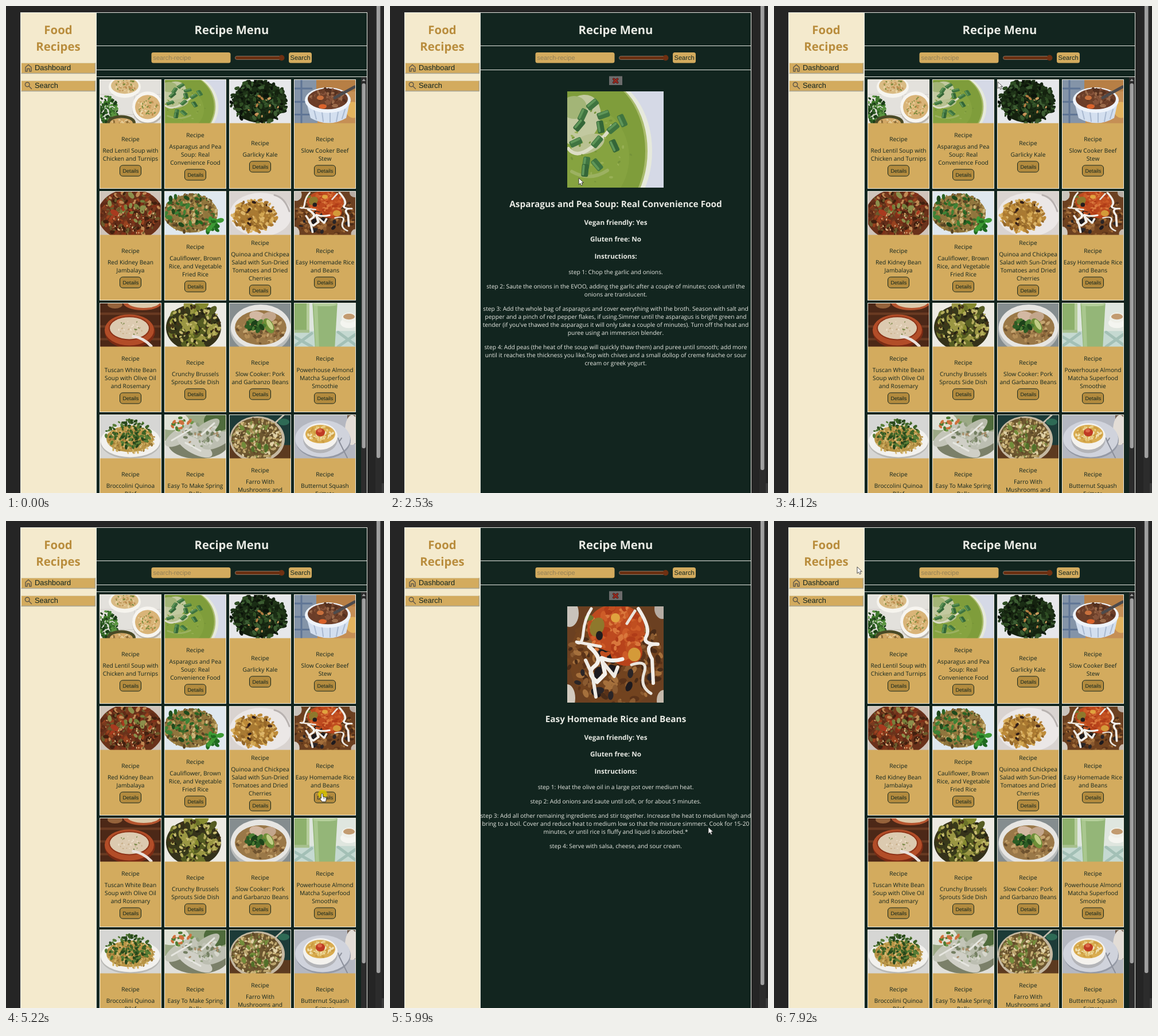
An HTML page for the animation above (7.99 s loop, 659 by 850 pixels).

```html
<!DOCTYPE html>
<html lang="en">
<head>
<meta charset="utf-8">
<title>Recipe menu</title>
<style>
html, body { margin: 0; width: 100%; height: 100%; overflow: hidden; background: #252525; }
svg { display: block; }
text { font: 10.22px "Open Sans", "Noto Sans", sans-serif; text-anchor: middle; text-rendering: geometricPrecision; }
.ui { font-family: "Liberation Sans", Arial, sans-serif; text-anchor: start; fill: #12251f; }
.dark { fill: #12251f; }
.light { fill: #e8eae4; }
.brand { fill: #b98d3d; }
.hint { fill: #8a7a56; }
.bold { font-weight: 700; }
.soft { filter: blur(.6px); }
</style>
</head>
<body>
<svg id="stage" width="659" height="850" viewBox="0 0 659 850"></svg>
<script>
const GREEN = '#12251f', GOLD = '#d3ab5e', LOOP = 7990;

let seed = 1;
const rnd = () => {
  seed = (seed * 1664525 + 1013904223) >>> 0;
  return seed / 4294967296;
};
const fix = v => v.toFixed(1);

// Drawing helpers, all returning SVG markup
const R = (x, y, w, h, c, extra = '') =>
  `<rect x="${x}" y="${y}" width="${w}" height="${h}" fill="${c}" ${extra}/>`;
const E = (x, y, rx, ry, c, turn = 0) =>
  `<ellipse cx="${fix(x)}" cy="${fix(y)}" rx="${fix(rx)}" ry="${fix(ry)}" fill="${c}" transform="rotate(${fix(turn)} ${fix(x)} ${fix(y)})"/>`;
const L = (d, c, w) =>
  `<path d="${d}" fill="none" stroke="${c}" stroke-width="${w}" stroke-linecap="round" stroke-linejoin="round"/>`;
const T = (s, x, y, cls, size) =>
  `<text x="${x}" y="${y}" class="${cls}"${size ? ` style="font-size:${size}px"` : ''}>${s}</text>`;
const bg = c => R(-5, -5, 180, 180, c);

// Scatter n small blobs inside an ellipse
const S = (n, x, y, rx, ry, size, colors) => {
  const list = colors.split(' ');
  let out = '';
  for (let i = 0; i < n; i++) {
    const a = rnd() * 2 * Math.PI, r = Math.sqrt(rnd()), s = size * (.6 + .8 * rnd());
    out += E(x + rx * r * Math.cos(a), y + ry * r * Math.sin(a), s, s * .6, list[i % list.length], rnd() * 180);
  }
  return out;
};
const chive = (x, y, turn, c = '#3f7440') =>
  R(x - 6, y - 11, 12, 22, c, `rx="3" transform="rotate(${turn} ${x} ${y})"`) +
  R(x - 5, y - 10, 4, 19, '#5f9659', `rx="2" transform="rotate(${turn} ${x} ${y})"`);

// Photos are drawn in a 106 x 75 box, the two enlarged ones in 168 x 168
const lentil = () => bg('#e3e1dc') + L('M0 25H106M0 60H106M60 0V75', '#cfccc6', 1) +
  E(43, 12, 28, 19, '#f6f4ee') + E(43, 10, 24, 14, '#d9bb84') + S(40, 43, 10, 20, 11, 2, '#e9d3a4 #b98a4d #7c8a3c #c99f62') +
  E(84, 49, 28, 28, '#b9b4ab') + E(83, 47, 27, 27, '#f7f5f0') + E(83, 47, 22, 21, '#d9b478') +
  S(70, 83, 47, 18, 17, 2, '#ecd6a6 #bf9050 #7d8d40 #e0bb7a') +
  S(130, 11, 53, 19, 25, 3, '#2c5a22 #3f7a2c #1c3d18 #5a9440') +
  E(37, 74, 25, 13, '#4a4a26') + E(37, 75, 20, 9, '#d2a765') + S(20, 37, 74, 16, 6, 2, '#8a6a35 #e5cb96');

const soup = () => bg('#d5d9e6') + E(56, 104, 92, 128, '#e6e9dc') + E(48, 104, 92, 128, '#a9bb6c') +
  E(45, 104, 91, 128, '#7f9d3b') + E(30, 115, 78, 90, '#86a340') +
  E(22, 50, 34, 46, '#c2c9a0', 25) + E(12, 28, 22, 20, '#a3b577') + E(36, 92, 30, 16, '#b9c192', -20) +
  L('M2 100Q16 118 42 98T78 60', '#dcddc6', 6) + L('M8 140Q40 158 70 138', '#9cb161', 6) +
  S(40, 50, 95, 65, 65, 2.5, '#98b055 #75933a') +
  chive(44, 23, 50) + chive(63, 41, 70) + chive(27, 41, 25) + chive(21, 59, 40, '#346638') + chive(80, 64, 50) +
  chive(96, 51, -25) + chive(58, 62, -10, '#346638') + chive(15, 89, 65) + chive(52, 88, 40) + chive(82, 95, -25, '#346638') +
  chive(33, 125, 8) + chive(31, 138, 5, '#346638') + chive(52, 128, -40);

const kale = () => bg('#e6e7ea') + E(51, 38, 45, 36, '#15220f') +
  S(260, 51, 38, 49, 38, 4, '#14220f #22381a #2f4e24 #0b130a #1a2d15 #3c5c32') + S(14, 58, 46, 30, 20, 2.5, '#b27c42 #c99a5e');

const stew = () => bg('#c58f55') + R(0, 0, 40, 75, '#8494a8') + L('M0 15H30M0 38H22M0 60H40M12 0V75', '#5f7595', 3) +
  R(38, -5, 70, 25, '#b77f45') + E(102, 52, 12, 14, '#e2b35e') +
  '<path d="M20 36L28 66Q60 84 90 66L97 36Z" fill="#d3dfef"/>' + L('M34 52L38 68M48 56L50 72M62 57V73M76 56L73 72M88 51L83 67', '#a9b9d0', 2) +
  E(58, 35, 40, 22, '#eef3fa') + E(58, 33, 35, 18, '#6b3d28') +
  S(60, 58, 32, 31, 15, 4, '#85533a #54301f #9a6a4a #6d4029') + E(49, 46, 7, 4, '#d9622b') + E(45, 31, 6, 4, '#c8703d') +
  L('M70 31L105 12', '#4d4b4d', 5);

const jambalaya = () => bg('#cfc4ba') + E(53, 40, 57, 45, '#6a321b') +
  S(280, 53, 38, 54, 41, 4, '#7a3b1f #98421f #5f2b17 #c08a55 #7f3019 #6b5a2c #41200f') +
  S(18, 50, 32, 40, 26, 6, '#76803c #a83a1f #8b8f4c') + S(50, 60, 50, 40, 22, 1.6, '#e0b98a #3a1d10');

const cauliflower = () => bg('#dfe8ee') + E(45, 38, 47, 33, '#8f753d') +
  S(280, 44, 37, 46, 33, 3, '#b0924f #7c6030 #ccb67c #594524 #3c6a2a #95793f') +
  S(26, 36, 32, 38, 27, 4.5, '#2c6424 #3f8235 #1f4a1c') + S(14, 82, 56, 20, 13, 5, '#1f6a1f #3d9a35');

const chickpea = () => bg('#d9d3d0') + E(54, 40, 54, 38, '#ebe7e6') + L('M78 6Q96 10 104 34', '#b8b2b0', 3) +
  E(43, 42, 33, 24, '#a87a33') + S(180, 43, 42, 39, 28, 3.5, '#bd8a38 #d3a752 #946729 #dcb56a #ab7931') +
  S(9, 47, 38, 30, 22, 3, '#2f1d18 #4a2d1c');

const rice = () => bg('#6b4021') + E(4, 12, 16, 24, '#c9c3bb') + E(0, 160, 14, 24, '#d2cabf') + E(166, 4, 14, 18, '#b6aca3') +
  E(168, 164, 12, 18, '#c5b9ab') + E(84, 92, 80, 88, '#72431f') +
  S(260, 84, 92, 82, 82, 6, '#8a5a30 #5b3319 #a5703c #70431f #4a2c18') + S(16, 80, 120, 75, 42, 8, '#1d1a1e #2a2527') +
  E(85, 38, 50, 42, '#bd4a1f') + E(103, 80, 28, 24, '#b8431b') +
  S(100, 87, 45, 47, 48, 6, '#cd5c28 #b03c18 #d9773c #c04f20') + E(52, 36, 12, 17, '#8e782c', 20) +
  E(84, 20, 8, 8, '#e0a33f') + E(117, 84, 11, 12, '#d49a39') + E(56, 51, 6, 8, '#211d1f') + E(38, 20, 8, 5, '#6f782c') +
  L('M42 4Q30 22 28 46T16 62L58 70', '#f0ece6', 5) + L('M38 70Q64 92 48 104T52 132L66 118L60 90Q78 98 96 92', '#f4f1ec', 7) +
  L('M32 94L44 120L50 158M64 100L82 122L88 106', '#eeeae4', 6) + L('M124 4Q146 38 138 52T158 66Q132 64 148 92L150 134', '#f2eee9', 6) +
  L('M112 102Q142 92 134 116T146 152M104 30L118 8', '#e9e4dc', 5);

const tuscan = () => bg('#4c2817') + L('M0 18H106M0 40H106M0 62H106', '#693a22', 4) + E(74, -2, 34, 14, '#b5552f') +
  E(76, -2, 28, 10, '#dcc9a9') + E(26, 2, 13, 7, '#96633b') +
  E(52, 49, 44, 29, '#7a2b14') + E(51, 46, 43, 27, '#b24d28') + E(51, 43, 36, 21, '#8c3217') + E(51, 43, 34, 19, '#dccab0') +
  S(26, 51, 42, 25, 13, 1.5, '#7d8b4c #efe2cd #c7ad87') + L('M58 57Q76 60 89 74', '#e9e1dc', 5);

const brussels = () => bg('#eceae2') + E(50, 42, 48, 40, '#35321a') +
  S(44, 52, 38, 46, 36, 10, '#85892f #555c22 #9a9643 #38391a #6c722a') + S(110, 52, 38, 46, 35, 3, '#b5ad5b #242313 #c7bb70 #453518');

const pork = () => bg('#858d8f') + E(54, 45, 53, 42, '#b9bcbb') + E(54, 41, 52, 39, '#e6e5e2') + E(54, 42, 45, 30, '#9a7848') +
  S(110, 54, 45, 41, 25, 3.5, '#b48e58 #8d6639 #c5a570 #6e522f') + E(49, 23, 15, 9, '#d3b8a2', 15) + E(68, 24, 13, 9, '#c3a68c', -15) +
  E(68, 39, 8, 14, '#6f8f38', -30) + E(70, 37, 4, 10, '#c2cd86', -30) + S(20, 44, 38, 16, 8, 5, '#2c5c24 #1d421a #4c7d33');

const matcha = () => bg('#dfe6df') + R(-5, 48, 116, 40, '#c5d9d1') + L('M0 58L30 75M0 74L30 52M76 50L106 72M76 75L106 54', '#a3c0b6', 5) +
  R(-5, -5, 30, 55, '#8db06c') + R(21, -5, 5, 55, '#b6cd9c') + R(-5, 46, 31, 5, '#a7c08e') +
  E(95, 34, 15, 9, '#f4f5f0') + E(95, 25, 13, 9, '#eff0e9') + E(95, 23, 10, 5, '#c29b70') +
  '<path d="M31 -5H75L70 80H36Z" fill="#94b678"/><path d="M33 -5H40L43 80H37Z" fill="#a9c78f"/>' + E(53, 2, 21, 3, '#b5cf9b');

const quinoa = () => bg('#d6d6d4') + E(53, 48, 52, 28, '#b9b9b6') + E(53, 45, 52, 28, '#f2f1ee') + E(52, 41, 41, 23, '#b99646') +
  S(200, 52, 42, 43, 24, 2.2, '#cfb062 #b8924a #dcc184 #9a7736') + S(120, 50, 32, 40, 24, 3, '#3c6226 #577d36 #28481c');

const rolls = () => bg('#9ba985') + E(12, 10, 30, 16, '#dfe2d6') + E(92, 10, 24, 18, '#4f6b3c') + E(46, 66, 80, 26, '#e0dfd9') +
  E(58, 50, 52, 26, '#7b8069') +
  E(30, 34, 34, 13, '#c3c5b8', -32) + E(66, 30, 36, 12, '#b7bbaa', -38) + E(52, 54, 34, 13, '#cfcfc6', 28) + E(90, 44, 28, 12, '#bcbeb1', -24) +
  S(26, 30, 16, 18, 12, 4, '#4f7c33 #cf703c #6f9648 #e3dfd0') + S(50, 62, 36, 36, 20, 3.5, '#8f9c7c #d6d7cc #a98c68 #747f62 #c3c5b8') +
  L('M12 44L46 24M36 48L62 62M64 34L86 14', '#e6e6e0', 3);

const farro = () => bg('#1d3b38') + R(-5, 52, 116, 40, '#5c3a20') + L('M70 22L94 0', '#c3bcae', 3) + E(94, 12, 10, 6, '#2e6a55') +
  E(48, 42, 48, 40, '#c5b8a1') + E(47, 41, 44, 36, '#6d5730') +
  S(280, 47, 41, 43, 35, 2.8, '#cdb67c #a58a51 #e0d2a8 #5f4a29 #7f8a45 #bba46e') + S(14, 48, 40, 38, 28, 5, '#728c3a #52702a');

const frittata = () => bg('#b4b7c0') + R(92, -5, 20, 55, '#6e5a4c') + E(100, 26, 12, 26, '#e3ddd6') + E(50, 44, 48, 32, '#959aa6') + E(49, 41, 48, 32, '#d0d3dc') +
  E(45, 42, 30, 24, '#b3b4b8') + E(45, 37, 30, 23, '#f4f2ee') + E(45, 33, 26, 16, '#d9ac50') +
  S(60, 45, 33, 23, 13, 2.5, '#e8cd83 #cc9c42 #f0e0b0') + E(45, 30, 8, 7, '#bf3a24') + E(44, 27, 4, 3, '#dd6a48') +
  L('M78 46L92 74M76 40L78 46L82 40', '#8b8f9a', 2);

const cards = [
  [lentil, 'Red Lentil Soup with|Chicken and Turnips'],
  [soup, 'Asparagus and Pea|Soup: Real|Convenience Food'],
  [kale, 'Garlicky Kale'],
  [stew, 'Slow Cooker Beef|Stew'],
  [jambalaya, 'Red Kidney Bean|Jambalaya'],
  [cauliflower, 'Cauliflower, Brown|Rice, and Vegetable|Fried Rice'],
  [chickpea, 'Quinoa and Chickpea|Salad with Sun-Dried|Tomatoes and Dried|Cherries'],
  [rice, 'Easy Homemade Rice|and Beans'],
  [tuscan, 'Tuscan White Bean|Soup with Olive Oil|and Rosemary'],
  [brussels, 'Crunchy Brussels|Sprouts Side Dish'],
  [pork, 'Slow Cooker: Pork|and Garbanzo Beans'],
  [matcha, 'Powerhouse Almond|Matcha Superfood|Smoothie'],
  [quinoa, 'Broccolini Quinoa|Pilaf'],
  [rolls, 'Easy To Make Spring|Rolls'],
  [farro, 'Farro With|Mushrooms and|Asparagus'],
  [frittata, 'Butternut Squash|Frittata']
];

const photo = (draw, x, y, w, h) => {
  seed = draw.name.length * 7919 + 5;
  const box = draw === soup || draw === rice ? '168 168' : '106 75';
  return `<svg x="${x}" y="${y}" width="${w}" height="${h}" viewBox="0 0 ${box}" preserveAspectRatio="none"><g class="soft">${draw()}</g></svg>`;
};

// Text and button are centred together below the photo
const card = ([draw, title], i) => {
  const x = 163 + i % 4 * 113, y = 128 + (i >> 2) * 195, mid = x + 54;
  const lines = title.split('|'), n = lines.length;
  const first = y + 142 - 7 * n, btn = y + 145.5 + 7 * n;
  return R(x + .5, y + .5, 107, 190, GOLD, 'stroke="#efece0"') + photo(draw, x + 1, y + 1, 106, 75.5) +
    T('Recipe', mid, first - 20, 'dark') + lines.map((s, k) => T(s, mid, first + 14 * k, 'dark')).join('') +
    R(x + 35.5, btn - 9.5, 37, 19, '#b38b3e', `rx="5" stroke="${GREEN}"`) + T('Details', x + 40.5, btn + 3, 'ui', 9.1);
};

const pageThumb = end => R(646, -8, 6.5, end + 8, '#9f9f9f', 'rx="3"');

const CROSS = 'M390 127.5L396.5 133.5M396.5 127.5L390 133.5';
const closeBtn = R(382, 122.5, 23, 15.5, '#6c6c6c', 'id="close"') + L(CROSS, '#3a1512', 4) +
  `<g id="cross">${L(CROSS, 'currentColor', 2.6)}</g>`;

const detail = (draw, name, steps) => {
  let y = 467.5;
  const text = steps.map((step, i) => {
    const lines = `step ${i + 1}: ${step}`.split('|');
    const out = lines.map((s, k) => T(s, 393.5, y + 14 * k, 'light')).join('');
    y += 11 + 14 * lines.length;
    return out;
  }).join('');
  return photo(draw, 309, 149, 168, 168) + T(name, 393.5, 350.5, 'light bold', 15.33) +
    T('Vegan friendly: Yes', 393.5, 381.5, 'light bold', 11.7) +
    T('Gluten free: No', 393.5, 411, 'light bold', 11.7) +
    T('Instructions:', 393.5, 440.5, 'light bold', 11.7) + text;
};

const navItem = (label, y, icon) => R(27, y, 129, 19, GOLD) +
  L(`M27 ${y + .5}H156`, '#dfd3ae', 1) + L(`M27 ${y + 18.5}H155.5V${y + 1}`, '#a9a593', 1.4) +
  L(icon, '#5c5548', 1.4) + T(label, 50, y + 13.3, 'ui', 12.9);

const frame = R(644, 0, 11, 850, '#2c2c2c') + R(655, 833, 4, 17, '#3a3a3a') +
  R(157, 11, 473, 900, GREEN) + R(25, 11, 132, 839, '#f4eacd') +
  R(25.5, 11.5, 604, 900, 'none', 'stroke="#e6e8e2"') + L('M157.5 12V850', '#e6e8e2', 1) +
  T('Food', 91, 49, 'brand bold', 20.4) + T('Recipes', 91, 78, 'brand bold', 20.4) +
  navItem('Dashboard', 99, 'M34 107L39 102.5L44 107V114H41V109.5H37V114H34Z') +
  navItem('Search', 130, 'M41 137A3.8 3.8 0 1 1 33.4 137A3.8 3.8 0 1 1 41 137M40 140L44.5 144.5') +
  T('Recipe Menu', 393.5, 49, 'light bold', 20.3) +
  R(157.5, 69.5, 472, 42, 'none', 'stroke="#e6e8e2"') +
  R(253.5, 81, 138, 18.5, GOLD, 'rx="3.5"') + `<g opacity=".9">${T('search-recipe', 256.5, 94, 'ui', 10.9).replace('"ui"', '"ui hint"')}</g>` +
  R(399.5, 87.5, 83, 6, '#6a2f11', 'rx="3" stroke="#9a8878" stroke-width=".8"') + E(480.5, 90.5, 5, 5, '#6f3012') +
  R(493, 81, 40, 18.5, GOLD, 'rx="3.5"') + T('Search', 495.5, 94, 'ui', 11.1);

const list = R(619, 124, 10, 726, '#2c2c2c') + R(620.5, 135, 6.5, 637, '#9f9f9f', 'rx="3"') +
  '<path d="M620.5 131L623.8 127L627 131Z" fill="#9f9f9f"/>' + L('M158 123.5H629', '#e6e8e2', 1) +
  cards.map(card).join('') + pageThumb(789);

const pea = detail(soup, 'Asparagus and Pea Soup: Real Convenience Food', [
  'Chop the garlic and onions.',
  'Saute the onions in the EVOO, adding the garlic after a couple of minutes; cook until the|onions are translucent.',
  "Add the whole bag of asparagus and cover everything with the broth. Season with salt and|pepper and a pinch of red pepper flakes, if using.Simmer until the asparagus is bright green and|tender (if you've thawed the asparagus it will only take a couple of minutes). Turn off the heat and|puree using an immersion blender.",
  'Add peas (the heat of the soup will quickly thaw them) and puree until smooth; add more|until it reaches the thickness you like.Top with chives and a small dollop of creme fraiche or sour|cream or greek yogurt.'
]);
const beans = detail(rice, 'Easy Homemade Rice and Beans', [
  'Heat the olive oil in a large pot over medium heat.',
  'Add onions and saute until soft, or for about 5 minutes.',
  'Add all other remaining ingredients and stir together. Increase the heat to medium high and|bring to a boil. Cover and reduce heat to medium low so that the mixture simmers. Cook for 15-20|minutes, or until rice is fluffy and liquid is absorbed.*',
  'Serve with salsa, cheese, and sour cream.'
]);

const arrow = '<path d="M0 0V11.5L2.7 9L4.5 13L6.6 12L4.9 8.2H8.4Z" fill="#fff" stroke="#222" stroke-width=".8"/>';
const hand = '<path d="M-1.5 1.5Q0 -.5 1.5 1.5V6L6 7Q8 7.5 7.5 10L6.5 15H0L-3.5 10Q-4.5 7.5-1.5 9Z" fill="#fff" stroke="#222" stroke-width=".9"/>' +
  L('M2.6 7V10M4.8 7.5V10', '#444', .7);

const layer = (id, body) => `<g id="${id}">${body}</g>`;
const stage = document.getElementById('stage');
stage.innerHTML = frame + layer('list', list) + layer('blank', pageThumb(810)) + layer('tools', closeBtn) +
  layer('pea', pea) + layer('beans', beans) +
  layer('cursor', layer('glow', E(1, 2, 8, 8, '#d9c400d0')) + layer('arrow', arrow) + layer('hand', hand));

const $ = id => document.getElementById(id);
const show = (id, on) => { $(id).style.display = on ? '' : 'none'; };

const views = [[0, 'list'], [2050, 'blank'], [2250, 'pea'], [4050, 'list'], [5290, 'pea'], [5500, 'beans'], [7040, 'list']];
// Cursor waypoints: time, x, y
const path = [
  [260, 590, 826], [480, 500, 620], [680, 390, 370], [800, 318, 264], [960, 381, 300], [1090, 380, 301], [1500, 322, 298],
  [1700, 322, 298], [1910, 325, 295], [2250, 325, 295], [2530, 329, 300], [3010, 368, 425], [3080, 370, 420], [3850, 390, 132],
  [4120, 390, 132], [4810, 545, 468], [5010, 551, 475], [5640, 551, 475], [5950, 571, 572], [6480, 364, 86],
  [6550, 370, 116], [6830, 387, 133], [7300, 387, 133], [7510, 448, 296], [7920, 145, 80]
];
const presses = [[1910, 2050], [3900, 4050], [5150, 5290], [6900, 6960]];
const hands = [[1430, 2050], [4880, 5290]];
const inside = (spans, t) => spans.some(([a, b]) => t >= a && t < b);

function cursorAt(t) {
  const i = path.findIndex(p => p[0] > t);
  if (i < 0) return path[path.length - 1].slice(1);
  if (i === 0) return path[0].slice(1);
  const [t0, x0, y0] = path[i - 1], [t1, x1, y1] = path[i], k = (t - t0) / (t1 - t0);
  return [x0 + (x1 - x0) * k, y0 + (y1 - y0) * k];
}

function draw() {
  const t = performance.now() % LOOP;
  const view = views.filter(v => v[0] <= t).pop()[1];
  const [x, y] = cursorAt(t), pointing = inside(hands, t);
  const hover = x > 381 && x < 405 && y > 122 && y < 139;
  show('list', view === 'list');
  show('blank', view !== 'list');
  show('tools', view === 'pea' || view === 'beans');
  show('pea', view === 'pea');
  show('beans', view === 'beans');
  $('close').setAttribute('fill', hover ? '#5a5a5a' : '#6c6c6c');
  $('cross').setAttribute('color', hover ? '#c9302a' : '#97291f');
  show('cursor', t >= 260);
  show('glow', inside(presses, t));
  show('hand', pointing);
  show('arrow', !pointing);
  $('cursor').setAttribute('transform', `translate(${fix(x)} ${fix(y)})`);
  requestAnimationFrame(draw);
}
draw();
</script>
</body>
</html>
```
